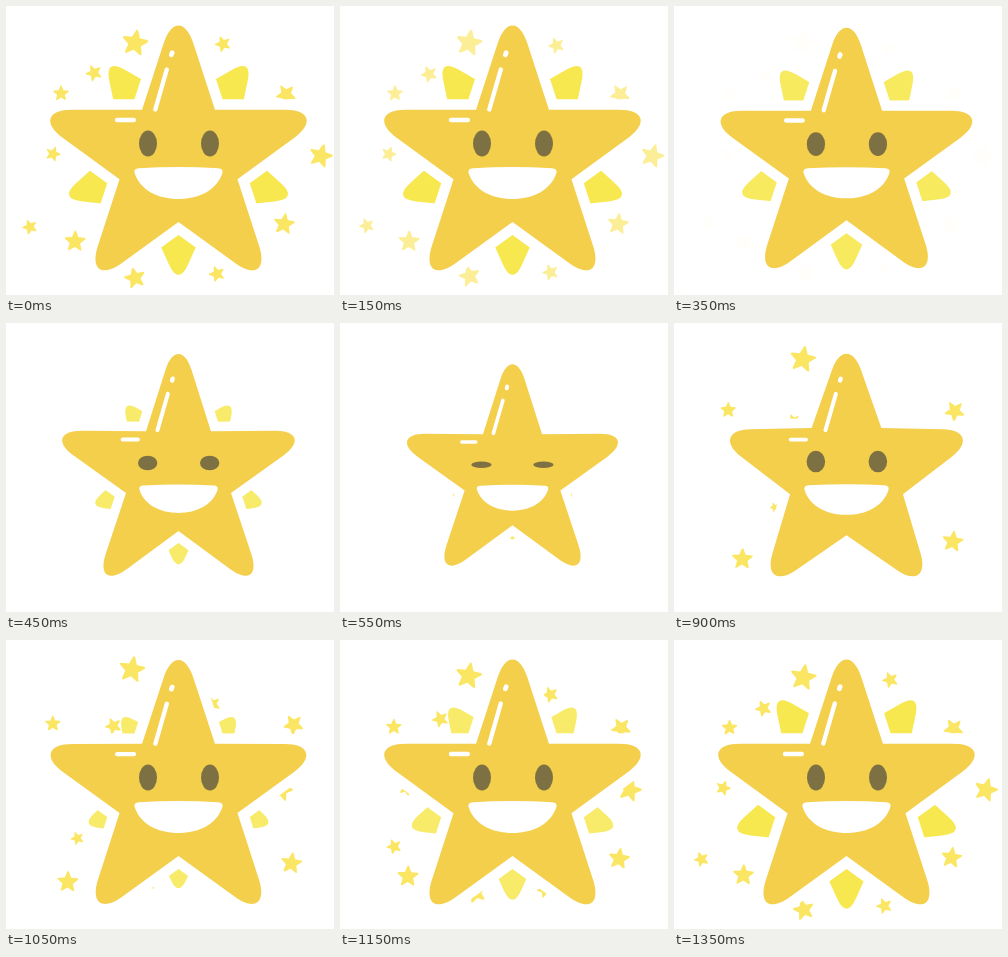
An HTML page with a canvas for the animation above (1.4 s loop, 328 px wide and 289 px high).

```html
<!DOCTYPE html>
<html lang="en">
<head>
<meta charset="utf-8">
<title>Smiling star</title>
<style>
  html, body { margin: 0; width: 100%; height: 100%; overflow: hidden; background: #fff; }
  canvas { display: block; width: 328px; height: 289px; }
</style>
</head>
<body>
<canvas id="stage"></canvas>
<script>
const W = 328, H = 289, LOOP = 1400, STEP = 50;
const CX = 172.5, CY = 154, PIVOT = 142, HUB = 150;
const GOLD = '#f4cf4c', RAY = '#f7e850', SPARK = '#fbe664', EYE = '#7d7043';

const canvas = document.getElementById('stage');
const ctx = canvas.getContext('2d');
const dpr = window.devicePixelRatio || 1;
canvas.width = W * dpr;
canvas.height = H * dpr;

// Sparks: x, y, radius, tilt in degrees
const poppers = [[129, 37, 14.5, 10], [55, 87.5, 8.7, 0], [280, 88.5, 11, -31],
  [69, 235.5, 11.7, 2], [278, 218, 11.7, 8]];
const drifters = [[217, 38, 8.7, -22], [88, 67, 9, -24], [47, 148, 8.2, 20], [314.7, 150, 13, 16],
  [24, 221, 8.2, -22], [129, 272, 11.7, -14], [211, 268, 8.7, -20]];

function ease(t, from, to) {
  const p = Math.min(1, Math.max(0, (t - from) / (to - from)));
  return (1 - Math.cos(Math.PI * p)) / 2;
}

const dip = (t, a, b, c, d) => ease(t, a, b) - ease(t, c, d);

// Damped spring from 0 to 1, at rest before it starts
function spring(u) {
  return u < 0 ? 0 : 1 - Math.exp(-0.009 * u) * Math.cos(0.011 * u);
}

// Five-pointed star with softened tips and sharp notches
function starPath(cx, cy, outer, inner, soft) {
  const pt = i => {
    const r = i % 2 ? inner : outer, a = i * Math.PI / 5 - Math.PI / 2;
    return [cx + r * Math.cos(a), cy + r * Math.sin(a)];
  };
  const along = ([x, y], [u, v], d) => {
    const k = d / Math.hypot(u - x, v - y);
    return [x + (u - x) * k, y + (v - y) * k];
  };
  ctx.beginPath();
  for (let i = 0; i < 10; i += 2) {
    const tip = pt(i), prev = pt(i - 1), next = pt(i + 1);
    ctx.lineTo(...prev);
    ctx.lineTo(...along(tip, prev, soft));
    ctx.bezierCurveTo(...along(tip, prev, soft * 0.48), ...along(tip, next, soft * 0.48),
      ...along(tip, next, soft));
  }
  ctx.closePath();
}

function zoomed(s, x, y, draw) {
  ctx.save();
  ctx.translate(x, y);
  ctx.scale(s, s);
  ctx.translate(-x, -y);
  draw();
  ctx.restore();
}

function spark(x, y, r, tilt) {
  ctx.save();
  ctx.translate(x, y);
  ctx.rotate(tilt * Math.PI / 180);
  starPath(0, 0, r * 1.06, r * 0.47, r * 0.22);
  ctx.fill();
  ctx.restore();
}

function sparks(t, away) {
  ctx.globalAlpha = t < 700 ? 1 - ease(t, 0, 390) : 1;
  ctx.fillStyle = SPARK;
  const pop = t < 700 ? 1 : spring(t - 755);
  for (const [x, y, r, tilt] of poppers) {
    spark(CX + (x - CX) * pop, PIVOT + (y - PIVOT) * pop, r * Math.min(1, pop), tilt);
  }
  // The far ones have further to come
  for (const [x, y, r, tilt] of drifters) {
    const dx = x - CX, dy = y - HUB;
    const k = Math.max(0, 1 - away * Math.hypot(dx, dy) * 0.00123);
    spark(CX + dx * k, HUB + dy * k, r * Math.min(1, k * 1.3), tilt);
  }
  ctx.globalAlpha = 1;
}

function rays(k) {
  ctx.fillStyle = RAY;
  ctx.globalAlpha = Math.max(0.85, 1 - 1.8 * (1 - k));
  for (let i = 0; i < 5; i++) {
    ctx.save();
    ctx.translate(CX, CY);
    ctx.rotate(i * Math.PI * 0.4);
    ctx.scale(k, k);
    ctx.beginPath();
    ctx.moveTo(-34, 50);
    ctx.lineTo(-9.8, 104);
    ctx.quadraticCurveTo(0, 126, 9.8, 104);
    ctx.lineTo(34, 50);
    ctx.fill();
    ctx.restore();
  }
  ctx.globalAlpha = 1;
}

function line(x0, y0, x1, y1, width) {
  ctx.lineWidth = width;
  ctx.beginPath();
  ctx.moveTo(x0, y0);
  ctx.lineTo(x1, y1);
  ctx.stroke();
}

function body(puff) {
  starPath(CX, CY, 162.3, 62 * puff, 48);
  ctx.strokeStyle = '#fff';
  ctx.lineJoin = ctx.lineCap = 'round';
  ctx.lineWidth = 21;
  ctx.stroke();
  ctx.fillStyle = GOLD;
  ctx.fill();
  line(149.3, 103.5, 160.8, 63.5, 4.4);
  line(165.4, 48.8, 166.1, 46.8, 4.8);
  line(111, 114, 127.8, 114, 4.4);
}

function mouth() {
  ctx.fillStyle = '#fff';
  ctx.beginPath();
  ctx.moveTo(128.6, 167);
  ctx.quadraticCurveTo(127.5, 162.5, 133, 162.2);
  ctx.quadraticCurveTo(172.5, 160, 212, 162.2);
  ctx.quadraticCurveTo(217.5, 162.5, 216.4, 167);
  ctx.bezierCurveTo(211, 184, 193, 193, 172.5, 193);
  ctx.bezierCurveTo(152, 193, 134, 184, 128.6, 167);
  ctx.fill();
}

function eyes(shut) {
  ctx.fillStyle = EYE;
  for (const x of [142, 204]) {
    ctx.beginPath();
    ctx.ellipse(x - 0.6 * shut, 137.6 + 4.4 * shut, 9 + 1.2 * shut, 13 - 10.3 * shut, 0, 0, Math.PI * 2);
    ctx.fill();
  }
}

function draw(t) {
  ctx.setTransform(dpr, 0, 0, dpr, 0, 0);
  ctx.fillStyle = '#fff';
  ctx.fillRect(0, 0, W, H);

  // The face and the notches recover before the tips do
  const scale = 1 - 0.213 * dip(t, 280, 650, 690, 1080);
  const shut = dip(t, 280, 600, 720, 980);
  const faceScale = 1 - 0.2 * shut;

  const left = (LOOP - t) / 250;
  const away = t < 700 ? 0.3 * ease(t, 0, 400) : left ** 1.35;
  const retract = t < 700 ? 0.55 * ease(t, 280, 650) : Math.min(0.55, 0.08 * left ** 2.4);

  sparks(t, away);
  rays(1 - retract);
  zoomed(scale, CX, PIVOT, () => body(faceScale / scale));
  zoomed(faceScale, CX, 165, mouth);
  eyes(shut);
}

const start = performance.now();
function tick() {
  const t = (performance.now() - start) % LOOP;
  draw(Math.floor(t / STEP) * STEP);
  requestAnimationFrame(tick);
}
tick();
</script>
</body>
</html>
```
